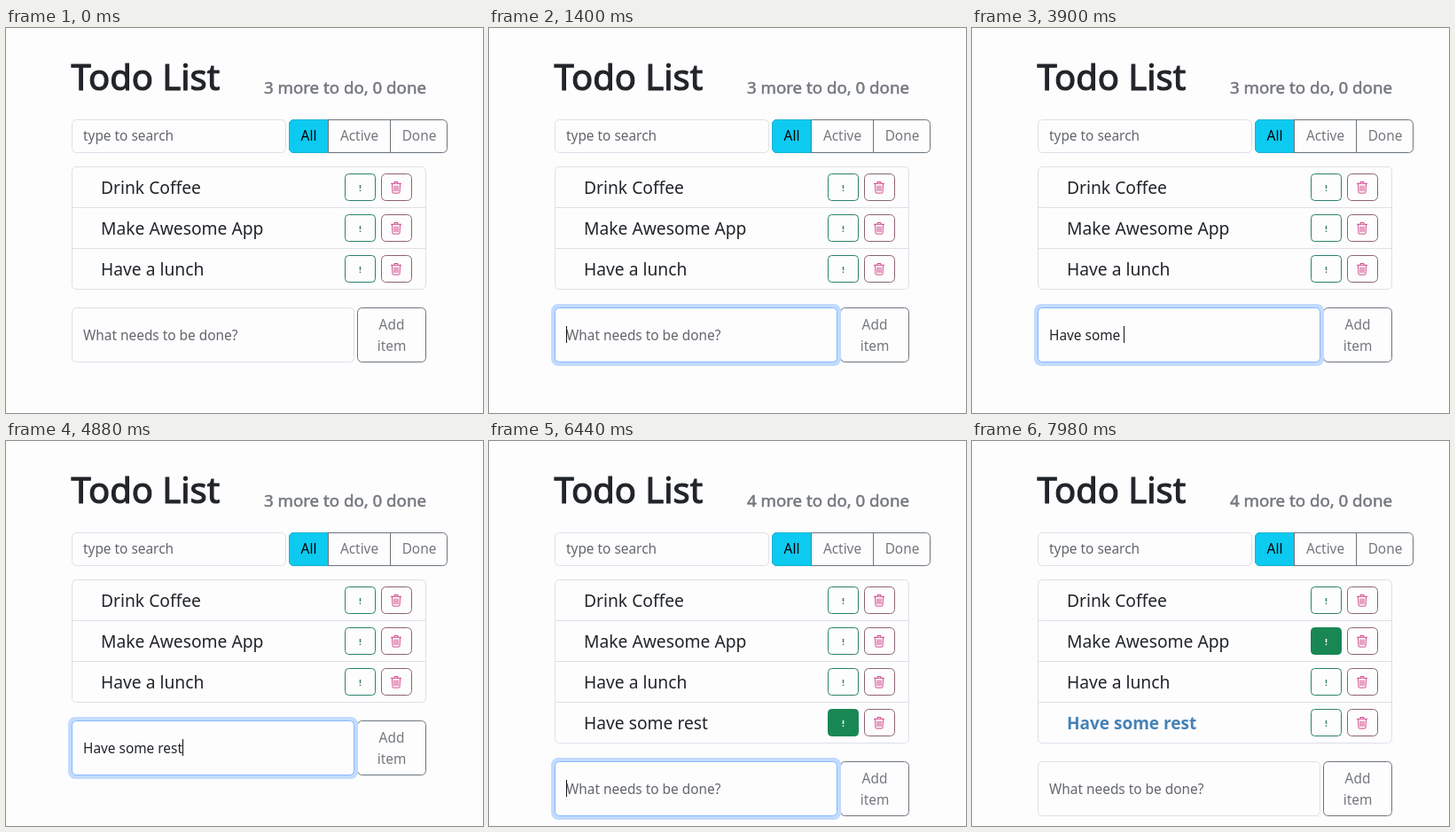
An HTML page that plays this animation: 538x434 px, repeating every 8000 ms.

```html
<!DOCTYPE html>
<html lang="en">
<head>
<meta charset="utf-8">
<title>Todo List</title>
<style>
  html, body { margin: 0; width: 100%; height: 100%; overflow: hidden; background: #fdfdfe; }
  svg { display: block; font: 15.4px "Noto Sans", sans-serif; }
</style>
</head>
<body>
<svg id="stage" width="538" height="434" viewBox="0 0 538 434"></svg>
<script>
const LOOP = 8000, FADE = 150;
const PAPER = [253, 253, 254], INK = [33, 37, 41], MUTED = [116, 120, 126], HINT = [98, 102, 108];
const GREY = [108, 117, 125], GREEN = [25, 135, 84], LINE = [222, 223, 232];
const RING = [194, 219, 254], RING_EDGE = [134, 183, 254];
const FOCUS = 1000, SUBMIT = 5250, MARK = 6450;
const items = ['Drink Coffee', 'Make Awesome App', 'Have a lunch', 'Have some rest'];

// Time of each key press
const keys = [1700, 1850, 2000, 2180, 3060, 3200, 3360, 3500, 3650, 3900, 4050, 4200, 4350, 4500];

// Periods in which the pointer rests on each control
const hovers = {
  active: [[5788, 5960]],
  add: [[6680, 7300]],
  check0: [[5990, 6070]],
  check1: [[6070, 6150], [7740, 9000]],
  check2: [[6150, 6230], [7560, 7680]],
  check3: [[6230, 6590], [7380, 7520]],
};

const stage = document.getElementById('stage');
const ruler = document.createElement('canvas').getContext('2d');
const clamp = v => Math.max(0, Math.min(1, v));
const rgb = c => `rgb(${c.map(Math.round)})`;
const mix = (a, b, k) => a.map((v, i) => v + (b[i] - v) * k);

function fade(t, start, end) {
  const k = clamp((t - start) / FADE) - clamp((t - end) / FADE);
  return k * k * (3 - 2 * k);
}

const hover = (t, id) => Math.max(0, ...(hovers[id] || []).map(([a, b]) => fade(t, a, b)));

function box(x, y, w, h, stroke, fill = PAPER, r = 5) {
  return `<rect x="${x}" y="${y}" width="${w}" height="${h}" rx="${r}" fill="${rgb(fill)}" stroke="${rgb(stroke)}"/>`;
}

function label(x, y, text, color, attrs = '') {
  return `<text x="${x}" y="${y}" fill="${rgb(color)}" ${attrs}>${text}</text>`;
}

// A thin outline gives the medium weight
function heading(x, y, text, color, size, attrs = '') {
  return label(x, y, text, color, `font-size="${size}" stroke="${rgb(color)}" stroke-width="${size * .028}" ${attrs}`);
}

const centered = (x, y, text, color) => label(x, y, text, color, 'text-anchor="middle"');
const path = (d, attrs) => `<path d="${d}" ${attrs}/>`;

function header(count) {
  return heading(73.5, 70, 'Todo List', INK, 40) +
    heading(474, 74, `${count} more to do, 0 done`, MUTED, 18.7, 'text-anchor="end"');
}

function filters(t) {
  const k = hover(t, 'active');
  return box(74.5, 103.5, 241, 37, LINE) +
    label(87, 127, 'type to search', HINT) +
    box(319.5, 103.5, 178, 37, GREY) +
    path('M363.5 103.5H324.5a5 5 0 0 0-5 5v27a5 5 0 0 0 5 5h39z', 'fill="#0dcaf0" stroke="#18b4d6"') +
    box(363.5, 103.5, 70, 37, GREY, mix(PAPER, GREY, k), 0) +
    centered(341.5, 127, 'All', [0, 0, 0]) +
    centered(398.5, 127, 'Active', mix(MUTED, PAPER, k * .8)) +
    centered(466, 127, 'Done', MUTED);
}

function trash(x, y) {
  return `<g transform="translate(${x} ${y})" fill="none" stroke="#d2488a">` +
    path('M-6 -4.5H6M-2 -4.5V-6.3H2V-4.5M-4.5 -4.5L-4 5.5Q-4 6.3 -3 6.3H3Q4 6.3 4 5.5L4.5 -4.5M-2 -2.3V4.3M0 -2.3V4.3M2 -2.3V4.3', '') +
    '</g>';
}

function row(t, i) {
  const y = 157 + 46 * i, k = hover(t, 'check' + i), important = i === 3 && t >= MARK;
  const mark = rgb(mix([60, 130, 90], PAPER, k));
  return (i ? path(`M74.5 ${y - .5}H473.5`, `stroke="${rgb(LINE)}"`) : '') +
    label(107, y + 29.5, items[i], important ? [70, 130, 180] : INK,
      important ? 'font-size="19" font-weight="700"' : 'font-size="19.25"') +
    box(382.5, y + 7.5, 34, 30, mix([44, 130, 108], GREEN, k), mix(PAPER, GREEN, k), 4) +
    path(`M399.5 ${y + 20}v4M399.5 ${y + 25.5}v1.5`, `stroke="${mark}" stroke-width="1.5"`) +
    box(423.5, y + 7.5, 34, 30, [140, 98, 112]) + trash(440, y + 22.8);
}

function entry(t, y) {
  const typed = t < SUBMIT ? keys.filter(k => k <= t).length : 0;
  const text = items[3].slice(0, typed);
  const glow = fade(t, FOCUS, MARK), k = hover(t, 'add');
  const lastInput = Math.max(...[FOCUS, ...keys, SUBMIT].filter(time => time <= t));
  const caret = t >= FOCUS && t < MARK && (t - lastInput) % 1000 < 500;
  ruler.font = getComputedStyle(stage).font;
  const caretX = Math.round(87 + ruler.measureText(text).width) + .5;
  const words = mix(MUTED, PAPER, k);
  return box(396.5, y + .5, 77, 61, GREY, mix(PAPER, GREY, k)) +
    centered(435, y + 24.5, 'Add', words) + centered(435, y + 48.5, 'item', words) +
    `<rect x="70" y="${y - 4}" width="327" height="70" rx="8" fill="${rgb(RING)}" opacity="${glow}"/>` +
    box(74.5, y + .5, 318, 61, mix(LINE, RING_EDGE, glow)) +
    label(87, y + 36.5, text || 'What needs to be done?', text ? INK : HINT, 'xml:space="preserve"') +
    (caret ? path(`M${caretX} ${y + 21}v19`, 'stroke="#111"') : '');
}

function draw(now) {
  const t = now % LOOP, count = t < SUBMIT ? 3 : 4;
  const rows = items.slice(0, count).map((_, i) => row(t, i)).join('');
  stage.innerHTML = header(count) + filters(t) +
    box(74.5, 156.5, 399, 46 * count, LINE) + rows + entry(t, 177 + 46 * count);
  requestAnimationFrame(draw);
}
requestAnimationFrame(draw);
</script>
</body>
</html>
```
